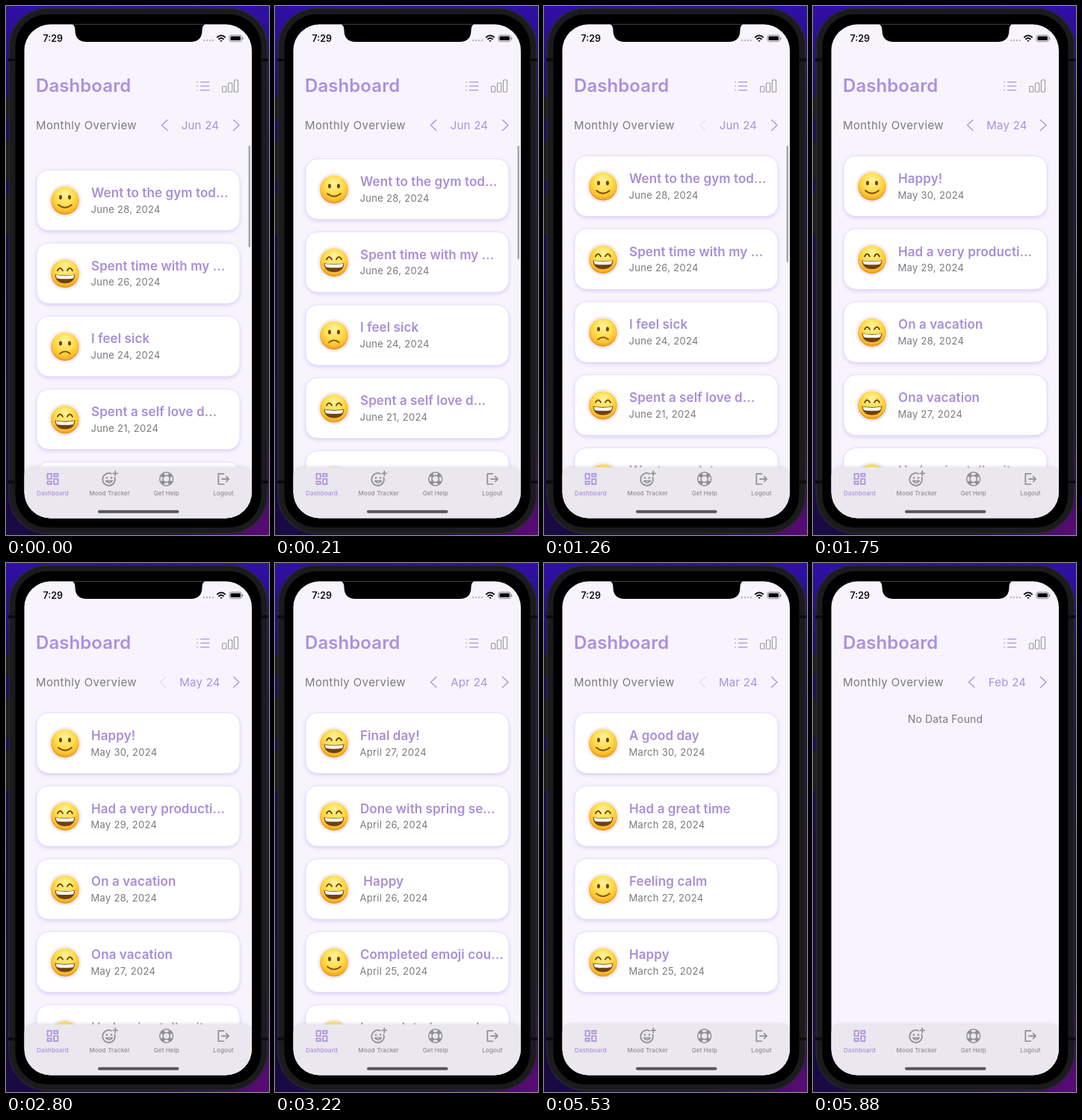
Write an HTML page that moves like this. It is 352 by 708 pixels and loops after 8000 ms.

```html
<!DOCTYPE html>
<html lang="en">
<head>
<meta charset="utf-8">
<title>Mood dashboard</title>
<style>
  html, body { margin: 0; width: 100%; height: 100%; overflow: hidden; background: #0d0820; }
  svg { display: block; }
  text { font-family: Inter, "Open Sans", sans-serif; fill: #7b797f; white-space: pre; }
  .heading { font-size: 24px; font-weight: 600; fill: #ac90de; letter-spacing: .08px; }
  .sub { font-size: 15px; letter-spacing: .4px; }
  .month { font-size: 15px; letter-spacing: .25px; fill: #ac90de; text-anchor: middle; }
  .title { font-size: 17px; font-weight: 600; fill: #a98ed8; letter-spacing: .08px; }
  .date { font-size: 13px; letter-spacing: .3px; }
  .empty { font-size: 14px; letter-spacing: .15px; text-anchor: middle; }
  .clock { font-size: 12.5px; font-weight: 600; fill: #111; }
  .tab { font-size: 8px; font-weight: 500; letter-spacing: .12px; text-anchor: middle; fill: #8f8d94; }
  .on { fill: #ac90de; }
  .line { fill: none; stroke: #ac90de; stroke-width: 1.3; stroke-linecap: round; stroke-linejoin: round; }
  .gray { fill: none; stroke: #8f8d94; stroke-width: 1.7; stroke-linecap: round; stroke-linejoin: round; }
  .card { fill: #fff; stroke: #e6def9; filter: drop-shadow(0 2px 2px #c9bdf099); }

  .page { visibility: hidden; animation: 8s step-end infinite; }
  #jun { animation-name: jun; }
  #may { animation-name: may; }
  #apr { animation-name: apr; }
  #mar { animation-name: mar; }
  #feb { animation-name: feb; }
  @keyframes jun { 0% { visibility: visible } 17.5% { visibility: hidden } }
  @keyframes may { 17.5% { visibility: visible } 36.75% { visibility: hidden } }
  @keyframes apr { 36.75% { visibility: visible } 56% { visibility: hidden } }
  @keyframes mar { 56% { visibility: visible } 70% { visibility: hidden } }
  @keyframes feb { 70%, 100% { visibility: visible } }

  #jun .list { animation: settle 8s step-end infinite; }
  @keyframes settle {
    0% { transform: translateY(19px) } .875% { transform: translateY(11.3px) }
    1.75% { transform: translateY(6.7px) } 2.625% { transform: translateY(4px) }
    3.5% { transform: translateY(2.4px) } 4.375% { transform: translateY(1.4px) }
    5.25% { transform: translateY(.7px) } 6.125%, 100% { transform: none }
  }
  .bar { animation: grow 8s step-end infinite, vanish 8s linear infinite; }
  @keyframes grow {
    0% { height: 136px } .875% { height: 144px } 1.75% { height: 149px }
    2.625% { height: 152px } 3.5% { height: 154px } 4.375% { height: 155px }
    5.25%, 100% { height: 156px }
  }
  @keyframes vanish { 0%, 17.4% { opacity: 1 } 21.8%, 100% { opacity: 0 } }

  .back { animation: press 8s linear infinite; }
  @keyframes press {
    0%, 15.74% { opacity: 1 } 15.75%, 17.5% { opacity: .22 } 21.8%, 34.99% { opacity: 1 }
    35%, 36.75% { opacity: .22 } 40.2%, 55.12% { opacity: 1 }
    55.125%, 56% { opacity: .22 } 60.3%, 69.12% { opacity: 1 }
    69.125%, 70% { opacity: .22 } 73.4%, 100% { opacity: 1 }
  }
</style>
</head>
<body>
<svg width="352" height="708" viewBox="0 0 352 708">
  <defs>
    <linearGradient id="wall" x2="0" y2="1">
      <stop offset="0" stop-color="#3010a6"/><stop offset=".2" stop-color="#1d0b62"/>
      <stop offset=".55" stop-color="#190a3c"/><stop offset="1" stop-color="#1a0a44"/>
    </linearGradient>
    <radialGradient id="glow">
      <stop offset="0" stop-color="#5c0c78"/><stop offset="1" stop-color="#5c0c78" stop-opacity="0"/>
    </radialGradient>
    <radialGradient id="skin" cx=".5" cy=".4" r=".62" fy=".25">
      <stop offset="0" stop-color="#fff3a2"/><stop offset=".5" stop-color="#ffdf52"/>
      <stop offset=".8" stop-color="#fcc030"/><stop offset="1" stop-color="#e28d1a"/>
    </radialGradient>
    <clipPath id="screen"><rect x="24.500" y="24.500" width="304.500" height="661" rx="35"/></clipPath>

    <g id="head"><circle r="22" fill="#f3edfa"/><circle r="19" fill="url(#skin)"/></g>
    <g id="eyes" fill="#6b4210"><ellipse cx="-6" cy="-4.500" rx="2" ry="3"/><ellipse cx="6" cy="-4.500" rx="2" ry="3"/></g>
    <g id="smile">
      <use href="#head"/><use href="#eyes"/>
      <path d="M-9 5.500Q0 13 9 5.500" fill="none" stroke="#7f4d12" stroke-width="1.700" stroke-linecap="round"/>
    </g>
    <g id="grin">
      <use href="#head"/>
      <path d="M-10-4Q-6.500-10.500-3-4M3-4Q6.500-10.500 10-4" fill="none" stroke="#6b4210" stroke-width="1.800" stroke-linecap="round"/>
      <path d="M-13.500 1Q0 3.500 13.500 1Q12.500 13 0 13T-13.500 1" fill="#71400f"/>
      <path d="M-12.500 1.900Q0 4.200 12.500 1.900L11 6.300Q0 8-11 6.300Z" fill="#fff"/>
    </g>
    <g id="frown">
      <use href="#head"/><use href="#eyes"/>
      <path d="M-7 9.500Q0 3.500 7 9.500" fill="none" stroke="#7f4d12" stroke-width="1.700" stroke-linecap="round"/>
    </g>
  </defs>

  <rect width="352" height="708" fill="url(#wall)"/>
  <circle cx="352" cy="708" r="150" fill="url(#glow)"/>
  <g fill="#1c1c1f">
    <rect x="-2" y="122" width="7" height="30" rx="2"/>
    <rect x="-2" y="180" width="7" height="54" rx="2"/>
    <rect x="-2" y="251" width="7" height="54" rx="2"/>
  </g>
  <rect x="3.500" y="2.500" width="347" height="704" rx="52" fill="#29292c"/>
  <rect x="5" y="4" width="344" height="701" rx="50" fill="#1b1b1d"/>
  <path d="M3 72h9M342 72h9M3 637h9M342 637h9" stroke="#0c0c0e" stroke-width="4"/>
  <rect x="12.500" y="11" width="329" height="687" rx="43" fill="#000"/>

  <g clip-path="url(#screen)">
    <rect x="24" y="24" width="306" height="662" fill="#f7f4fe"/>
    <g id="pages"></g>
    <rect class="bar" x="324.500" y="187" width="2.600" height="156" rx="1.300" fill="#a7a5ac"/>

    <path d="M84 23Q92.500 24 92.500 32Q92.500 48 108 48H247Q262.500 48 262.500 32Q262.500 24 271 23Z"/>
    <text class="clock" x="49.500" y="47.500">7:29</text>
    <g fill="#b9b7be"><circle cx="265" cy="46" r="1.200"/><circle cx="269" cy="46" r="1.200"/><circle cx="273" cy="46" r="1.200"/><circle cx="277" cy="46" r="1.200"/></g>
    <g fill="none" stroke="#111" stroke-width="1.900">
      <path d="M282.300 42.200Q288 36.800 293.700 42.200M284.500 44.700Q288 41.500 291.500 44.700"/>
      <path d="M288 48L286.300 46.300Q288 45 289.700 46.300Z" fill="#111" stroke="none"/>
    </g>
    <rect x="299" y="39" width="16.500" height="8.600" rx="2.500" fill="none" stroke="#8b8990"/>
    <rect x="300.500" y="40.500" width="13.500" height="5.600" rx="1.300"/>
    <path d="M316.800 42v3" stroke="#8b8990" stroke-width="1.200"/>

    <text class="heading" x="40" y="115">Dashboard</text>
    <path class="line" d="M260.500 101.800h11.300M260.500 107.200h11.300M260.500 112.600h11.300M255.700 101.800h.6M255.700 107.200h.6M255.700 112.600h.6"/>
    <g fill="none" stroke="#99979e" stroke-width="1.100">
      <rect x="289.600" y="107.500" width="5.200" height="7.500" rx="1"/>
      <rect x="297.500" y="103" width="5.200" height="12" rx="1"/>
      <rect x="305.400" y="99" width="5.200" height="16" rx="1"/>
    </g>
    <text class="sub" x="40" y="164.500">Monthly Overview</text>
    <path class="line" d="M304.500 152.500L312 159.500L304.500 166.500"/>

    <path d="M24 686V631Q24 617.500 39 617.500H315Q330 617.500 330 631V686Z" fill="#eae7ee" style="filter:drop-shadow(0 -1px 2px #b9b0d060)"/>
    <path transform="translate(62.500 633) scale(.87) translate(-12 -12)" fill="none" stroke="#ac90de" stroke-width="2"
      d="M4 4h6v8H4ZM14 4h6v4h-6ZM14 12h6v8h-6ZM4 16h6v4H4Z"/>
    <path class="gray" d="M141 626A8.300 8.300 0 1 0 145.500 631M146.300 622.500v6M143.300 625.500h6M133.700 635.500Q138 641 142.300 635.500Z"/>
    <g fill="#8f8d94"><circle cx="135" cy="631.500" r="1.300"/><circle cx="141" cy="631.500" r="1.300"/></g>
    <g transform="translate(214.700 633)">
      <circle r="9.700" fill="#8f8d94"/>
      <circle r="3.800" fill="#eae7ee"/>
      <circle r="6.800" fill="none" stroke="#eae7ee" stroke-width="2.800" pathLength="360" stroke-dasharray="48 42" stroke-dashoffset="24"/>
    </g>
    <path class="gray" d="M291.500 626.200H284.300V640H291.500M289 633.100h8.700M294.700 629.700L298.100 633.100L294.700 636.500"/>
    <text class="tab on" x="62.500" y="654.500">Dashboard</text>
    <text class="tab" x="138.800" y="654.500">Mood Tracker</text>
    <text class="tab" x="214.800" y="654.500">Get Help</text>
    <text class="tab" x="291" y="654.500">Logout</text>
    <rect x="123" y="674.800" width="108.500" height="4" rx="2" fill="#58575b"/>
  </g>
</svg>
<script>
  const pitch = 97.7;
  const months = {
    Jun: [
      ["smile", "Went to the gym tod...", "June 28, 2024"],
      ["grin", "Spent time with my ...", "June 26, 2024"],
      ["frown", "I feel sick", "June 24, 2024"],
      ["grin", "Spent a self love d...", "June 21, 2024"],
      ["smile", "Went on a date", "June 20, 2024"]
    ],
    May: [
      ["smile", "Happy!", "May 30, 2024"],
      ["grin", "Had a very producti...", "May 29, 2024"],
      ["grin", "On a vacation", "May 28, 2024"],
      ["grin", "Ona vacation", "May 27, 2024"],
      ["smile", "Had a nice talk wit...", "May 26, 2024"]
    ],
    Apr: [
      ["grin", "Final day!", "April 27, 2024"],
      ["grin", "Done with spring se...", "April 26, 2024"],
      ["grin", " Happy", "April 26, 2024"],
      ["smile", "Completed emoji cou...", "April 25, 2024"],
      ["smile", "I completed my wal...", "April 24, 2024"]
    ],
    Mar: [
      ["smile", "A good day", "March 30, 2024"],
      ["grin", "Had a great time", "March 28, 2024"],
      ["smile", "Feeling calm", "March 27, 2024"],
      ["grin", "Happy", "March 25, 2024"]
    ],
    Feb: []
  };

  const card = ([mood, title, date], i) => `
    <g transform="translate(0 ${i * pitch})">
      <rect class="card" x="41" y="200.500" width="272" height="81" rx="16"/>
      <use href="#${mood}" x="79" y="241.500"/>
      <text class="title" x="114" y="237">${title}</text>
      <text class="date" x="113.500" y="257.800">${date}</text>
    </g>`;

  const page = ([name, items]) => {
    const shift = name === "May" ? -2 : 0;
    const list = items.map(card).join("") ||
      `<text class="empty" x="177" y="213.500">No Data Found</text>`;
    return `<g class="page" id="${name.toLowerCase()}">
      <text class="month" x="${260 + shift / 4}" y="164.500">${name} 24</text>
      <path class="line back" d="M${216 + shift} 152.500l-7.500 7l7.500 7"/>
      <g class="list">${list}</g></g>`;
  };

  document.getElementById("pages").innerHTML = Object.entries(months).map(page).join("");
</script>
</body>
</html>
```
